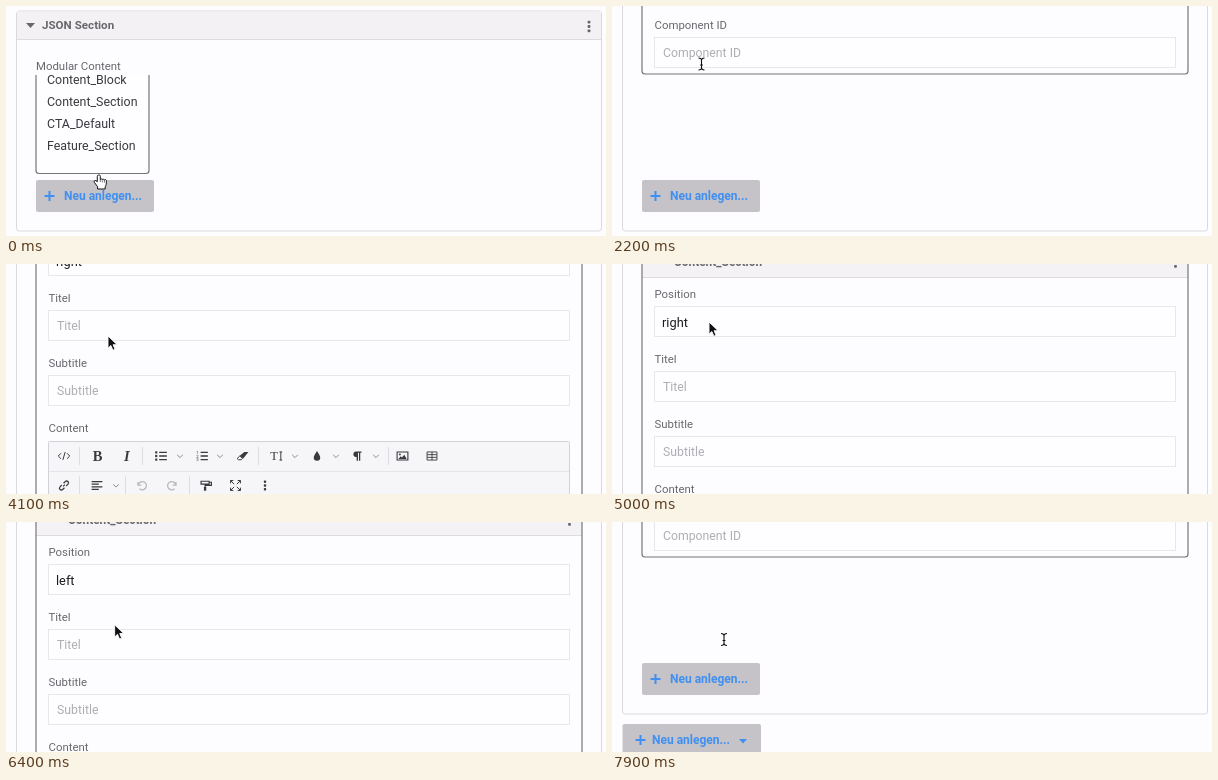
These frames come from a looping animation (600x230 px, 8000 ms). An HTML page:

```html
<!DOCTYPE html>
<html lang="de">
<head>
<meta charset="utf-8">
<title>JSON Section</title>
<style>
  html, body { margin: 0; width: 100%; height: 100%; overflow: hidden; background: #fdfcfe; }
  svg { display: block; width: 600px; height: 230px; }
  text { font-family: Roboto, "Open Sans", sans-serif; white-space: pre; }
  .mono { font-family: "DejaVu Sans Mono", monospace; }
  .serif { font-family: "Liberation Serif", "Noto Serif", serif; font-weight: 700; }
  .system { font-family: Inter, Roboto, sans-serif; }
  .line { fill: none; stroke: #3b393e; stroke-width: 1.4; }
  .faded .line { stroke: #b9b7bc; }
</style>
</head>
<body>
<svg id="stage" viewBox="0 0 600 230" xmlns="http://www.w3.org/2000/svg"></svg>
<script>
const LOOP = 8000, STEP = 100;
const COLLAPSED_Y = 56;    // item offset while only its header shows
const BOTTOM_SCROLL = 393; // distance from the form's top to its end
const GREY = '#69676c', DARK = '#3b393e', BLUE = '#418ff0', PAPER = '#fdfcfe';

// --- markup helpers -------------------------------------------------
const text = (x, cy, label, size, fill, attrs = '') =>
  `<text x="${x}" y="${cy + size * 0.35}" font-size="${size}" fill="${fill}" ${attrs}>${label}</text>`;
const rect = (x, y, w, h, fill, attrs = '') =>
  `<rect x="${x}" y="${y}" width="${w}" height="${h}" fill="${fill}" ${attrs}/>`;
const line = (d, attrs = '') => `<path class="line" d="${d}" ${attrs}/>`;
const shape = (d, fill = DARK) => `<path d="${d}" fill="${fill}"/>`;
const at = (x, y, body, scale = 1) => `<g transform="translate(${x} ${y}) scale(${scale})">${body}</g>`;
const group = (id, body, attrs = '') => `<g id="${id}" ${attrs}>${body}</g>`;

const dots = (x, y, fill = GREY, gap = 4.3, size = 2.8) =>
  [-gap, 0, gap].map(d => rect(x - size / 2, y + d - size / 2, size, size, fill, 'rx=".8"')).join('');
const input = y => rect(42.5, y, 521, 30, '#fefdff', 'stroke="#e9e7ec"');
const field = (label, y, placeholder = label) =>
  text(42.5, y, label, 11.4, GREY) + input(y + 12.5) + text(51, y + 27.3, placeholder, 12.25, '#b0aeb3');
const addButton = (x, y, w, plusX, labelX) =>
  rect(x, y, w, 32, '#c5c3c7', 'rx="2"') +
  line(`M${plusX - 5} ${y + 16}h10m-5-5v10`, `style="stroke:${BLUE};stroke-width:2"`) +
  text(labelX, y + 15.5, 'Neu anlegen...', 12, BLUE, 'font-weight="700"');

// --- toolbar --------------------------------------------------------
const icons = {
  code: line('M-3.4-3l-3 3 3 3M3.4-3l3 3-3 3M1.3-4.4l-2.6 8.8', 'style="stroke-width:1.1"'),
  list: line('M-2-4h8.5M-2 0h8.5M-2 4h8.5') + [-4, 0, 4].map(y => rect(-6.5, y - 1.2, 2.4, 2.4, DARK)).join(''),
  numbers: line('M-1.5-4h8M-1.5 0h8M-1.5 4h8') + [1, 2, 3].map(n => text(-6.3, n * 4 - 8, n, 4.8, DARK)).join(''),
  eraser: line('M-6 2.8L-3 0 0 2.8-1.5 4.2h-3z', 'style="stroke-width:1.1"') + shape('M-3-.4L2-4.5h4.6L.8 2.8z'),
  size: text(-7, 0, 'T', 14, DARK, 'class="serif" style="font-weight:400"') +
    line('M4.8-4.5v9M3.3-4.5h3M3.3 4.5h3', 'style="stroke-width:1.1"'),
  drop: shape('M0-5.5C2-2 3.6-.4 3.6 1.8a3.6 3.6 0 0 1-7.2 0C-3.6-.4-2-2 0-5.5z'),
  pilcrow: shape('M5-5H-1a3 3 0 0 0 0 6h.6V5.4H1.1v-9h1.1v9h1.4v-9H5z'),
  image: line('M-6-4.5h12v9h-12z', 'style="stroke-width:1.2"') + shape('M-4.5 3.2L-2 .4l1.4 1.2L2-1.4l2.6 4.6z') +
    `<circle cx="-2.9" cy="-1.8" r="1.1" fill="${DARK}"/>`,
  table: line('M-5.5-4.5h11v9h-11zM-5.5-1.5h11M-5.5 1.5h11M0-4.5v9', 'style="stroke-width:1"'),
  link: line('M-1 1l2-2M-.5-2.5L1.5-4.4a2 2 0 0 1 2.9 2.9L2.5.5M.5 2.5l-2 1.9a2 2 0 0 1-2.9-2.9l1.9-2'),
  align: line('M-6-4.2H6M-6-1.4h8M-6 1.4H6M-6 4.2h8'),
  undo: `<g class="faded">${line('M-4.5-4v3.7h3.7M-4.2-.6A4.6 4.6 0 1 1-2.8 3.6')}</g>`,
  roller: line('M-5.5-4.7h9v3.2h-9zM3.5-3.6H6v3.4H-1v2', 'style="stroke-width:1.3"') + shape('M-2.3 1.6h2.6v4.2h-2.6z'),
  expand: line('M-5.5-2.4v-3.1h3.1M2.4-5.5h3.1v3.1M5.5 2.4v3.1H2.4M-2.4 5.5h-3.1V2.4M-5.5-5.5l4 4M5.5-5.5l-4 4M5.5 5.5l-4-4M-5.5 5.5l4-4', 'style="stroke-width:1.1"'),
};
icons.redo = `<g transform="scale(-1 1)">${icons.undo}</g>`;

function editor(top) {
  const row1 = top + 14.5, row2 = top + 44;
  const place = (y, names) => Object.entries(names).map(([name, x]) => at(x, y, icons[name], 0.9)).join('');
  const chevrons = (y, xs) => xs.map(x =>
    line(`M${x - 2.8} ${y - 1.2}l2.8 2.8 2.8-2.8`, 'style="stroke:#8b898e;stroke-width:1"')).join('');
  const dividers = (y, xs) => xs.map(x => rect(x, y - 9, 1, 18, '#dedce2')).join('');
  return rect(42.5, top, 521, 141, '#fefdff', 'stroke="#d3d1d7" rx="1"') +
    rect(43, top + .5, 520, 59.5, '#f6f5f8') +
    rect(43, top + 29.5, 520, 1, '#e6e4e9') + rect(43, top + 59.5, 520, 1, '#d3d1d7') +
    place(row1, { code: 58, list: 155, numbers: 196, eraser: 236.5, size: 270.5, drop: 311, pilcrow: 351, image: 396.5, table: 426 }) +
    text(86.8, row1, 'B', 14.5, DARK, 'class="serif"') +
    text(118, row1, 'I', 14.5, DARK, 'class="serif" font-style="italic"') +
    chevrons(row1, [174, 214, 289, 330, 370]) + dividers(row1, [73, 136, 252, 382]) +
    place(row2, { link: 58, align: 91, undo: 136, redo: 166, roller: 200, expand: 229.5 }) +
    dots(259, row2, DARK, 3.8, 2.4) + chevrons(row2, [110]) + dividers(row2, [73, 119, 183]) +
    text(49.5, top + 73.5, 'Bitte geben Sie einen Text ein', 12.1, '#8f8d92') +
    rect(42.5, top + 141, 521, 10, '#f6f5f8', 'stroke="#d3d1d7"');
}

// --- scene ----------------------------------------------------------
const menuRows = ['Content_Block', 'Content_Section', 'CTA_Default', 'Feature_Section'];
const menu = rect(30, 60, 113, 107.5, '#fefdff', 'rx="3" stroke="#77757b" stroke-width="1.2"') +
  menuRows.map((label, i) => text(41, 74 + 22 * i, label, 12.4, DARK, `id="row${i}"`)).join('');

const head = rect(11, 5.5, 584, 28, '#f3f1f4') + rect(11, 33, 584, 1, '#dddbe0') +
  shape('M20 17h9l-4.5 5z', GREY) + text(36, 19, 'JSON Section', 11.6, GREY, 'font-weight="700"') +
  dots(583, 20.5) + text(30, 60, 'Modular Content', 11.4, GREY);

const itemHead = rect(30.5, -19.5, 545.5, 32.5, '#f4f2f5', 'id="itemHead"') +
  group('closedMark', shape('M43-7v9l5-4.5z', GREY)) + group('openMark', shape('M41-5h9l-4.5 5z', GREY)) +
  text(62, -2, 'Content_Section', 11.9, GREY, 'font-weight="700"') + dots(563.5, -2);

const fields = rect(30, 13, 546, 1, '#dddbe0') +
  text(42.5, 30, 'Position', 11.4, GREY) + input(42.5) + text(50, 58.2, 'right', 12.8, '#1c1b1e', 'id="choice"') +
  field('Titel', 95) + field('Subtitle', 160) +
  text(564, 160, 'content_subtitle', 9.35, '#4c4a4f', 'id="hint" class="mono" text-anchor="end"') +
  text(42.5, 225, 'Content', 11.4, GREY) + editor(238.5) + field('Component ID', 412);

const foot = addButton(30, 174, 118, 43.5, 58) + addButton(10.5, 235, 138.5, 28.5, 40) +
  shape('M127 250h8l-4 4.5z', BLUE);

const popup = rect(35.5, 25.5, 522.5, 47.5, '#e4e2e4', 'rx="6" stroke="#b9b7ba" style="filter:drop-shadow(0 4px 5px rgba(0,0,0,.32))"') +
  rect(40, 30, 513, 19.5, '#3b82f2', 'rx="4" id="highlight"') +
  text(55, 40, 'left', 11.4, '#222', 'id="left" class="system"') +
  text(55, 59.5, 'right', 11.4, '#222', 'id="right" class="system"') +
  line('M44 60l2.2 2.8 4-7', 'id="check"');

const cursors =
  group('hand', `<path d="M-1.2 0c-1.5 0-1.5 1-1.5 1.5v5.2L-4 5.7c-1.4-.7-2.4.6-1.6 1.7l3.2 4.3V14h7.6v-2.2c1-1.5 1.2-3 1.2-6 0-1.6-1.8-1.6-2-.4 0-1.6-2-1.7-2.1-.4 0-1.5-1.9-1.5-2-.3V1.3C.3.5 0 0-1.2 0z" fill="#fff" stroke="#111"/>` +
    line('M.3 5v2M2.3 5.4v2M4.4 5.8v1.8', 'style="stroke-width:.7"')) +
  group('beam', line('M-3-6q3 0 3 2.2Q0-6 3-6M0-4v8M-3 6q3 0 3-2.2Q0 6 3 6M-1.4 1h2.8', 'style="stroke:#111;stroke-width:1.1"')) +
  group('arrow', `<path d="M0 0v12.2l2.9-2.7 2 4.7 2.2-.9-2-4.6h4z" fill="#111" stroke="#fff" stroke-width=".9"/>`);

document.getElementById('stage').innerHTML =
  `<clipPath id="menuClip"><rect x="28" y="69" width="118" height="101"/></clipPath>` +
  rect(0, 0, 600, 230, PAPER) +
  rect(10.5, 5, 585, 220, PAPER, 'id="panel" rx="3" stroke="#dbd9de"') +
  group('head', head) +
  group('item', rect(30, -20, 546, 33, PAPER, 'id="itemBox"') + itemHead + group('fields', fields) +
    rect(30, -20, 546, 33, 'none', 'id="itemEdge" rx="3" stroke="#77757b" stroke-width="1.2"')) +
  group('foot', foot) + group('menu', menu, 'clip-path="url(#menuClip)"') +
  group('popup', popup) + cursors;

// --- motion ---------------------------------------------------------
const $ = id => document.getElementById(id);
const show = (id, on) => $(id).setAttribute('visibility', on ? 'visible' : 'hidden');
const move = (id, x, y) => $(id).setAttribute('transform', `translate(${x} ${y})`);
const set = (id, attrs) => Object.entries(attrs).forEach(([name, value]) => $(id).setAttribute(name, value));

const linear = k => k;
const easeOut = k => 1 - (1 - k) ** 2;
const smooth = k => k * k * (3 - 2 * k);

// Each key: [time, ...values, easing towards this key]
function track(keys, t) {
  const next = keys.findIndex(key => key[0] > t);
  if (next < 0) return keys[keys.length - 1].slice(1, -1);
  if (next === 0) return keys[0].slice(1, -1);
  const a = keys[next - 1], b = keys[next];
  const k = b[b.length - 1]((t - a[0]) / (b[0] - a[0]));
  return a.slice(1, -1).map((value, i) => value + (b[i + 1] - value) * k);
}

const scrollKeys = [
  [2200, -393, linear], [3000, -97, smooth], [3100, -92, linear], [3500, -86, easeOut],
  [3800, -86, linear], [4100, -61, easeOut], [4200, -61, linear], [4500, 0, easeOut],
  [6800, 0, linear], [6900, -14, linear], [7200, -152, linear], [7700, -426, easeOut],
];
const pointerKeys = [
  [0, 94, 169, linear], [200, 86, 97, easeOut], [300, 86, 97, linear], [400, 87, 96, linear],
  [1300, 87, 96, linear], [1600, 89.5, 52, easeOut], [2100, 89.5, 52, linear],
  [2200, 89.5, 58, linear], [2600, 102, 72, smooth], [4800, 102, 72, linear],
  [5000, 97, 58, easeOut], [5200, 97, 58, linear], [5600, 95, 43.5, smooth],
  [5900, 95, 43.5, linear], [6600, 112, 117.5, smooth],
];

function pointerShape(t) {
  if (t < 2200) return 'hand';
  if (t < 2500) return 'beam';
  return t < 6500 ? 'arrow' : 'beam';
}

function render(t) {
  const added = t >= 1000, open = t >= 2000;
  const scroll = Math.round(track(scrollKeys, t)[0]);
  const headY = open ? scroll - 89 : added ? -33 : 0;
  const footY = open ? scroll + BOTTOM_SCROLL : 0;
  const itemHeight = open ? 481 : 33;

  move('head', 0, headY);
  move('foot', 0, footY);
  set('panel', { y: headY + 5, height: footY - headY + 220 });

  move('item', 0, open ? scroll : COLLAPSED_Y);
  show('item', added);
  for (const id of ['itemBox', 'itemEdge']) set(id, { height: itemHeight });
  set('itemHead', { fill: t >= 1500 && t < 2000 ? '#eeecef' : '#f4f2f5' });
  $('fields').style.display = open ? '' : 'none';
  $('closedMark').style.display = open ? 'none' : '';
  $('openMark').style.display = open ? '' : 'none';
  $('hint').style.display = t >= 3100 && t < 3900 ? '' : 'none';
  $('choice').textContent = t >= 5900 ? 'left' : 'right';

  $('menu').style.display = added ? 'none' : '';
  set('row1', { fill: t >= 200 ? BLUE : DARK });

  const hovered = t < 5400 ? 'right' : t < 5800 ? 'left' : '';
  $('popup').style.display = t >= 5100 && t < 6000 ? '' : 'none';
  set('popup', { opacity: t >= 5900 ? 0.45 : 1 });
  $('highlight').style.display = hovered ? '' : 'none';
  set('highlight', { y: hovered === 'left' ? 30 : 49.5 });
  for (const id of ['left', 'right']) set(id, { fill: id === hovered ? '#fff' : '#222' });
  $('check').style.stroke = hovered === 'right' ? '#fff' : '#222';

  const [x, y] = track(pointerKeys, t);
  for (const id of ['hand', 'beam', 'arrow']) {
    show(id, id === pointerShape(t));
    move(id, x, y);
  }
}

const start = performance.now();
function tick() {
  const t = (performance.now() - start) % LOOP;
  render(Math.floor(t / STEP) * STEP);
  requestAnimationFrame(tick);
}
tick();
</script>
</body>
</html>
```
